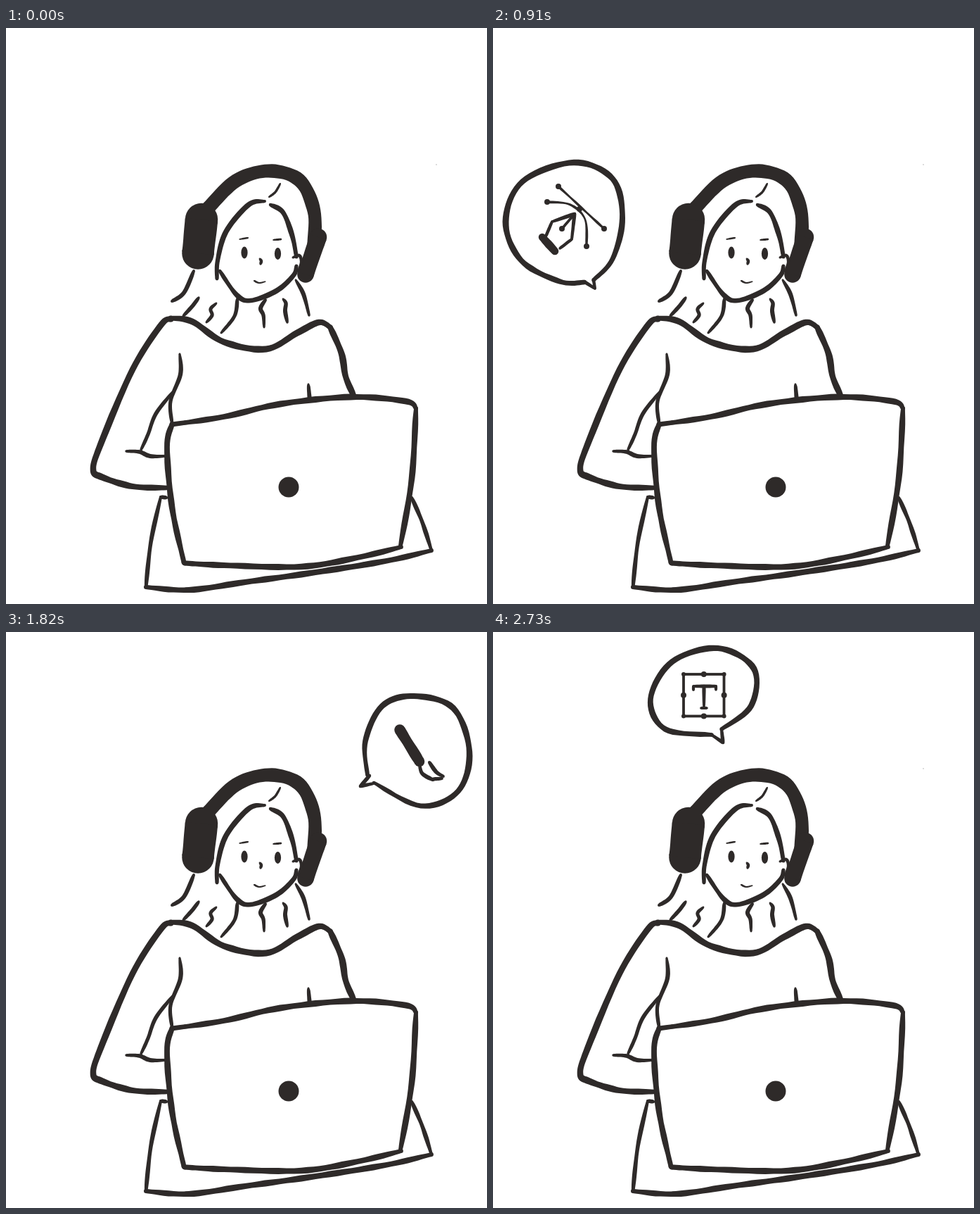
An HTML page that plays this animation: 684x818 px, repeating every 3640 ms.

```html
<!DOCTYPE html>
<html lang="en">
<head>
<meta charset="utf-8">
<title>Designer at work</title>
<style>
html, body { margin: 0; width: 100%; height: 100%; overflow: hidden; background: #fff; }
svg { display: block; width: 100%; height: 100%; fill: #2e2a29; }
</style>
</head>
<body>
<svg viewBox="0 0 684 818">
  <circle cx="612" cy="194" r=".9" fill="#ccc"/>
  <g id="person">
    <ellipse cx="339" cy="319" rx="4.6" ry="8.4"/>
    <ellipse cx="386.5" cy="320.5" rx="4.6" ry="8.4"/>
    <circle cx="402" cy="652" r="14.5"/>
  </g>
  <g id="pen" class="idea"></g>
  <g id="brush" class="idea"><circle cx="586" cy="168" r="70" fill="#fff"/></g>
  <g id="type" class="idea">
    <rect x="271" y="60" width="57.5" height="59.5" fill="none" stroke="#2e2a29" stroke-width="3.8"/>
  </g>
</svg>
<script>
const STEP = 910, LOOP = 4 * STEP, SAMPLES = 10;

function add(id, tag, attrs) {
  const el = document.createElementNS("http://www.w3.org/2000/svg", tag);
  for (const k in attrs) el.setAttribute(k, attrs[k]);
  document.getElementById(id).appendChild(el);
}

const dot = (id, cx, cy, r) => add(id, "circle", { cx, cy, r });

const spline = (a, b, c, d, u) =>
  b + u * (c - a + u * (2 * a - 5 * b + 4 * c - d + u * (3 * (b - c) + d - a))) / 2;

// Smooth curve through a few key points.
function curve(text) {
  const pts = text.split(" ").map(s => s.split(",").map(Number));
  const last = pts.length - 1;
  const at = i => pts[Math.max(0, Math.min(last, i))];
  return Array.from({ length: last * SAMPLES + 1 }, (_, n) => {
    const i = Math.min(last - 1, Math.floor(n / SAMPLES)), u = n / SAMPLES - i;
    return [0, 1].map(j => spline(at(i - 1)[j], at(i)[j], at(i + 1)[j], at(i + 2)[j], u));
  });
}

// Marker line: slightly uneven width, thinner at both ends by the taper share.
function ink(id, width, taper, text) {
  const line = curve(text), end = line.length - 1;
  const left = [], right = [];
  line.forEach(([x, y], i) => {
    const a = line[Math.max(0, i - 1)], b = line[Math.min(end, i + 1)];
    const dx = b[0] - a[0], dy = b[1] - a[1], len = Math.hypot(dx, dy) || 1;
    const thin = 1 - taper * (2 * i / end - 1) ** 4;
    const r = width / 2 * thin + 0.3 * Math.sin(x / 7 + y / 9);
    const nx = -dy / len * r, ny = dx / len * r;
    left.push((x + nx).toFixed(1) + " " + (y + ny).toFixed(1));
    right.unshift((x - nx).toFixed(1) + " " + (y - ny).toFixed(1));
    if (i % end === 0) dot(id, x, y, r);
  });
  add(id, "path", { d: "M" + left.concat(right).join("L") + "Z" });
}

const draw = (id, width, taper, ...lines) => lines.forEach(s => ink(id, width, taper, s));

// headphones
draw("person", 19, 0, "288,255 327,217 373,203 417,216 438,260 438,310");
draw("person", 46, 0, "278,272 273,320");
draw("person", 24, 0, "444,297 426,350");

// face
draw("person", 7, 0.35,
  "368,246 345,251 313,289 301,330 300,356",
  "376,251 394,262 407,295 413,325",
  "304,345 328,379 348,387 385,373 409,351 413,338");
draw("person", 4, 0.3,
  "408,326 417,323 420,332 416,344",
  "374,240 383,233 390,221",
  "361,328 363,331 362,335");
draw("person", 2.6, 0.3,
  "332,300 344,298", "380,301 391,300", "353,359 360,362 369,360");

// loose hair
draw("person", 5.6, 0.4,
  "267,345 253,376 236,388",
  "274,383 265,395 252,409",
  "299,391 291,399 293,408 285,418",
  "329,385 325,409 306,433",
  "369,386 362,398 366,408 367,425",
  "394,385 398,391 397,402 400,418",
  "412,358 423,378 431,408");

// sweater
draw("person", 9, 0.2,
  "234,412 265,417 310,446 370,456 414,433 445,418 461,425",
  "461,425 477,462 483,495 494,521",
  "235,414 221,421 180,485 135,590 124,627 137,638 180,651 228,653");
draw("person", 5.8, 0.4,
  "247,463 248,492 234,530 236,561",
  "237,517 213,548 202,577 192,599",
  "171,601 190,602 205,608 228,608",
  "430,506 432,530");

// laptop and stand
draw("person", 8.4, 0.25,
  "236,563 310,552 390,534 490,524 568,530 583,540",
  "583,540 577,640 561,735",
  "562,737 500,752 420,765 310,763 254,760",
  "236,563 229,595 236,680 253,759",
  "199,794 260,798 340,787 440,773 540,757 605,742");
draw("person", 6, 0.25,
  "228,667 220,666", "220,666 206,730 199,794", "605,742 592,702 577,667");

// vector pen
draw("pen", 8.4, 0.3,
  "130,361 95,360 40,330 18,275 42,218 115,191 170,214 184,270 170,328 143,358");
draw("pen", 5, 0.2,
  "143,358 145,370", "145,370 131,361",
  "116,264 84,275", "84,275 75,296", "95,313 112,300", "112,300 116,264");
draw("pen", 11, 0, "70,297 88,317");
draw("pen", 3.2, 0,
  "99,284 116,264", "93,225 158,285", "77,247 110,251 131,272 133,310");
for (const [x, y] of [[93, 225], [77, 247], [158, 285], [133, 310], [98, 285], [123, 257]]) {
  dot("pen", x, y, 4);
}

// paint brush
draw("brush", 8.4, 0.4,
  "514,203 511,155 535,105 580,91 636,108 659,170 643,226 590,247 523,214");
draw("brush", 5, 0.2, "517,204 504,219", "504,219 523,215");
draw("brush", 15, 0, "560,139 588,184");
draw("brush", 5.5, 0.2,
  "588,188 592,201 607,210", "607,209 620,208", "622,205 612,199 602,185");

// text tool
draw("type", 8.4, 0.3,
  "311,146 245,138 224,95 255,42 320,23 371,52 367,105 325,138");
draw("type", 5, 0.2, "325,138 327,157", "327,157 311,146");
draw("type", 4.6, 0.1,
  "285,82 285,77", "285,77 317,77", "317,77 317,82", "300,77 300,107", "296,108 304,108");
for (let k = 0; k < 8; k++) {
  const a = k * Math.PI / 4, side = v => Math.round(v * 1.2);
  dot("type", 299.8 + 28.8 * side(Math.cos(a)), 89.8 + 29.8 * side(Math.sin(a)), k % 2 ? 3 : 4);
}

const ideas = document.querySelectorAll(".idea");

function render(ms) {
  const now = Math.floor(ms % LOOP / STEP);
  ideas.forEach((el, i) => el.setAttribute("visibility", i + 1 === now ? "visible" : "hidden"));
}

function tick() {
  render(performance.now());
  requestAnimationFrame(tick);
}
tick();
</script>
</body>
</html>
```
